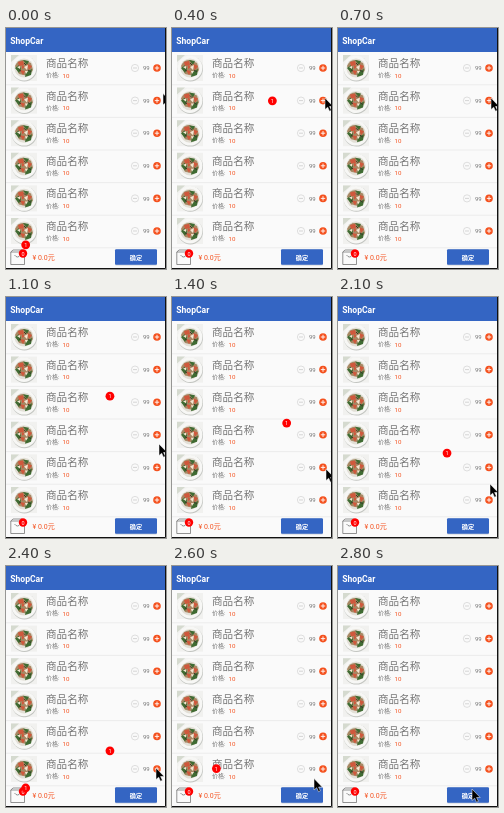
Recreate the animation shown at these times as an HTML page. Size 160 by 241 pixels, loop 2900 ms.

```html
<!DOCTYPE html>
<html lang="zh">
<head>
<meta charset="utf-8">
<title>ShopCar</title>
<style>
  html, body { margin: 0; width: 100%; height: 100%; overflow: hidden; background: #fafafa; }
  svg { display: block; font-family: Roboto, "Noto Sans CJK SC", "Noto Sans CJK", sans-serif; }
  .orange { fill: #f4511e; }
  .white { fill: #fff; }
  .mid { text-anchor: middle; }
</style>
</head>
<body>
<svg width="160" height="241" viewBox="0 0 160 241">
  <defs>
    <g id="dish">
      <rect width="26" height="26" fill="#f1f1ef"/>
      <path d="M0 0H8L0 7Z" fill="#d5dacf"/>
      <circle cx="13.4" cy="13.8" r="12.6" fill="#c3c5c1"/>
      <circle cx="13" cy="13" r="12.4" fill="#f7f7f5"/>
      <circle cx="13" cy="13" r="9.6" fill="#e2dfd6"/>
      <path d="M4 11Q7 4 13 5L20 8 22 15 17 21 8 19Z" fill="#a88763"/>
      <path d="M4 13L8 10 10 14 8 18ZM12 5L18 6 16 10ZM15 17L21 14 20 20 14 22Z" fill="#3f6b32"/>
      <path d="M7 7L12 6 13 10 8 11ZM16 9L21 11 18 15ZM9 15L14 16 12 20ZM11 10L14 12 11 14Z" fill="#d0583c"/>
      <path d="M13 12L17 10 16 15ZM6 12L9 11 9 14ZM14 16L17 16 15 19Z" fill="#f3e6d2"/>
      <path d="M13 8L15 10M8 15L10 16M17 15L20 17" stroke="#3a3a28"/>
    </g>
    <g id="item">
      <use href="#dish" x="5" y="-13"/>
      <text x="40" y="-1" font-size="10.6" fill="#757575">商品名称</text>
      <text x="40" y="9.3" font-size="6" fill="#757575">价格:</text>
      <text x="56.5" y="9.5" font-size="6.2" class="orange">10</text>
      <circle cx="129" r="3.6" fill="none" stroke="#ccc" stroke-width=".6"/>
      <path d="M127 0h4" stroke="#c4c4c4" stroke-width=".7"/>
      <text x="140.3" y="2.2" font-size="6" fill="#757575" class="mid">99</text>
      <circle cx="151" r="3.8" class="orange"/>
      <path d="M148.8 0h4.4M151 -2.2v4.4" stroke="#fff" stroke-width=".9"/>
      <path d="M0 16.8H160" stroke="#e6e6e6" stroke-width=".7"/>
    </g>
  </defs>

  <rect width="160" height="241" fill="#fafafa"/>
  <rect width="160" height="24" fill="#3465c3"/>
  <text x="4.2" y="15.9" font-size="8.6" font-weight="700" class="white">ShopCar</text>
  <g id="list"></g>

  <path d="M4.8 224H18.5V236.5H4.8ZM4.8 224L7 222H16L18.5 224M8.5 227Q11.5 231 14.5 227" fill="none" stroke="#666" stroke-width=".7"/>
  <circle cx="17" cy="225.5" r="4.2" fill="#f00"/>
  <text x="17" y="227.5" font-size="5.5" class="white mid">0</text>
  <text x="26.5" y="232" font-size="7" class="orange">¥ 0.0元</text>
  <rect x="109" y="221.5" width="42" height="16" rx="1.2" fill="#d0d3da"/>
  <rect x="109" y="221.3" width="42" height="15.5" rx="1.2" fill="#3465c3"/>
  <text x="130" y="231.6" font-size="6.2" font-weight="700" class="white mid">确定</text>

  <g id="dots"></g>
  <path id="cursor" d="M0 0V11.5L2.7 9.2 4.5 13.2 6.4 12.3 4.6 8.5H8.2Z" stroke="#fff" stroke-width=".5"/>
  <path d="M159.5 0V240.5H0" fill="none" stroke="#111"/>
</svg>
<script>
  const LOOP = 2900, STEP = 100, FLIGHT = 450, LIFT = 46;
  const plusX = 151, cart = { x: 17, y: 226 };
  const rowY = i => 40 + 32.6 * i;
  const $ = id => document.getElementById(id);

  // [click time, row]
  const clicks = [[-441, 0], [230, 1], [942, 2], [1278, 3], [1588, 4], [1959, 4], [2242, 5]];
  // [time, x, y] of the pointer tip
  const pointer = [[0, 157, 65.5], [200, 153, 70], [700, 153, 70], [900, 153, 104],
    [950, 153, 106], [1100, 153, 147], [1280, 153, 147], [1400, 154, 172],
    [2000, 154, 172], [2200, 150, 202], [2400, 150, 202], [2800, 134, 223]];

  for (let i = 0; i < 6; i++)
    $("list").innerHTML += `<use href="#item" y="${rowY(i)}"/>`;
  $("dots").innerHTML = clicks.map(() =>
    '<g><circle r="4.4" fill="#f00"/><text y="2" font-size="5.5" class="white mid">1</text></g>').join("");
  const dots = [...$("dots").children];

  const move = (el, x, y) => el.setAttribute("transform", `translate(${x} ${y})`);

  function pointerAt(t) {
    const i = Math.max(1, pointer.findIndex(k => k[0] >= t));
    const [t0, x0, y0] = pointer[i - 1], [t1, x1, y1] = pointer[i];
    const p = (t - t0) / (t1 - t0);
    return [x0 + (x1 - x0) * p, y0 + (y1 - y0) * p];
  }

  function draw(now) {
    const t = Math.floor(now % LOOP / STEP) * STEP;
    clicks.forEach(([start, row], i) => {
      const p = (t - start) / FLIGHT, y = rowY(row);
      dots[i].style.display = p >= 0 && p <= 1 ? "" : "none";
      // Quadratic curve whose control point lies above the start
      move(dots[i], plusX + (cart.x - plusX) * p,
        y - 2 * p * (1 - p) * LIFT + p * p * (cart.y - y));
    });
    move($("cursor"), ...pointerAt(t));
    requestAnimationFrame(() => draw(performance.now()));
  }
  draw(performance.now());
</script>
</body>
</html>
```
